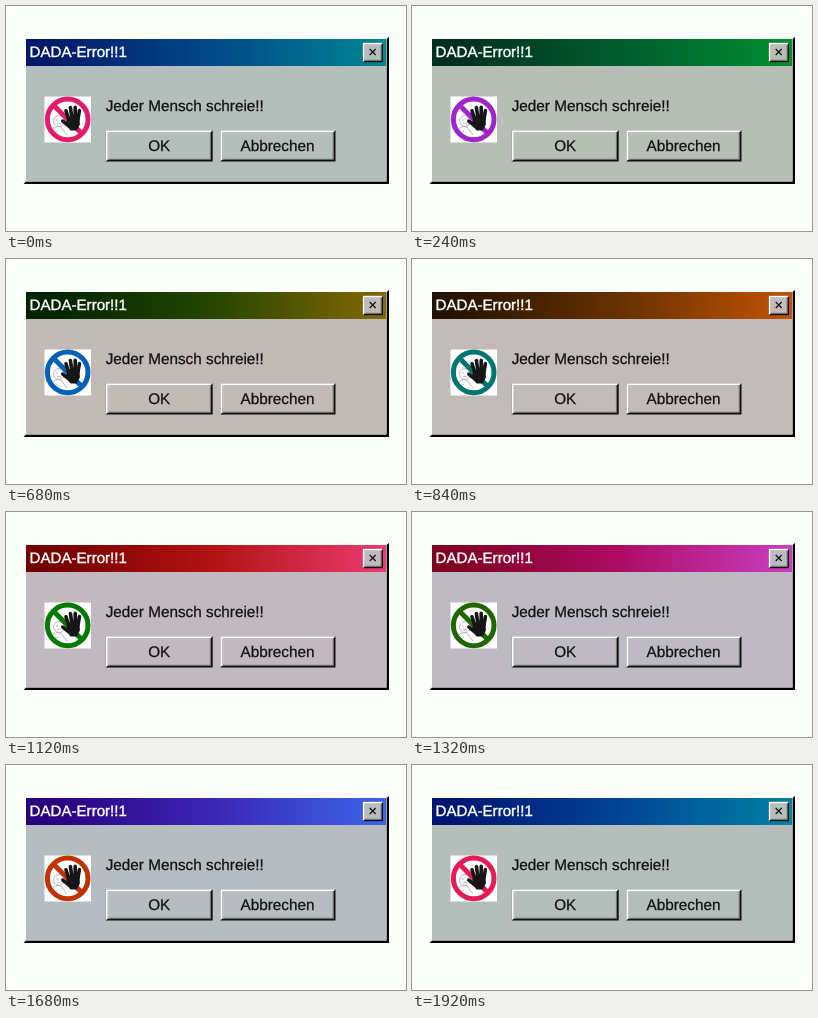
These frames come from a looping animation (400x225 px, 1.96 s). An HTML page:

```html
<!DOCTYPE html>
<html lang="de">
<head>
<meta charset="utf-8">
<style>
  html, body { margin: 0; width: 100%; height: 100%; overflow: hidden; background: #fcfefb; }
  svg { display: block; width: 100vw; height: 100vh; }
  text {
    font: 15.3px "Liberation Sans", Arial, sans-serif; text-rendering: geometricPrecision;
    fill: #111; stroke: #111; stroke-width: .25;
  }
  .title { font-size: 15.1px; fill: #fff; stroke: #fff; stroke-width: .4; }
  .face { fill: var(--panel); }
  .ring { stroke: var(--ring); fill: none; stroke-width: 5; }
  .shade { fill: #000; opacity: .35; }
  .hand { stroke: #161616; stroke-linecap: round; stroke-linejoin: round; fill: none; }
  .sketch { stroke: #aaa; stroke-width: .8; fill: none; }
</style>
</head>
<body>
<svg viewBox="0 0 400 225">
  <defs>
    <linearGradient id="bar">
      <stop offset=".05" stop-color="var(--from)"/>
      <stop offset=".52" stop-color="var(--mid)"/>
      <stop offset="1" stop-color="var(--to)"/>
    </linearGradient>
  </defs>

  <!-- window -->
  <path d="M17.5 178L20 175.5H380.5V33L383 31V178Z"/>
  <path class="face" d="M20 33H380.5V175.5H20Z"/>
  <rect x="20" y="33" width="360" height="27" fill="url(#bar)"/>
  <text class="title" x="23.6" y="51.2">DADA-Error!!1</text>

  <g id="buttons"></g>
  <path d="M363.7 43L369.7 49M369.7 43L363.7 49" stroke="#111" stroke-width="1.2"/>

  <!-- sign -->
  <rect x="38.5" y="90.5" width="46.5" height="46" fill="#fff"/>
  <g class="sketch">
    <circle cx="53" cy="115" r="5.5"/>
    <path d="M50 114h2M55 114h2M51 118q2 -2 4 0M45 125q4 -6 10 -4l6 8M47 128l5 -3"/>
  </g>
  <g class="ring">
    <circle cx="61.7" cy="113.4" r="20.3"/>
    <path d="M47.3 99L76.1 127.8"/>
  </g>
  <g class="hand">
    <path stroke-width="3.6" d="M62.5 113L60 104.8M65.8 111L64.4 101.6M69.2 111L69.2 101.4M72 113L73.4 104.6M63 120L56.8 115.2"/>
    <path fill="#161616" stroke-width="3" d="M62.7 112L72 112L72.4 118L69.8 123L65.3 123L61.5 118Z"/>
  </g>

  <text x="99.7" y="105">Jeder Mensch schreie!!</text>
  <text x="153.2" y="145" text-anchor="middle">OK</text>
  <text x="271.5" y="145" text-anchor="middle">Abbrechen</text>
</svg>
<script>
const STEP = 40, STEPS = 49;
const colors = {
  panel: [180, 190, 186],
  ring: [225, 28, 105],
  // Title bar; values below zero are clipped only after the rotation
  from: [-55, 25, 105],
  mid: [-45, 73, 138],
  to: [-26, 134, 148]
};

// Raised button: black outer edge, white highlight, soft inner shadow
function button(x, y, w, h, e) {
  const r = x + w, b = y + h;
  return `<rect x="${x}" y="${y}" width="${w}" height="${h}" fill="#111"/>
    <path d="M${x} ${b}V${y}H${r}L${r - e} ${y + e}L${x + e} ${b - e}Z" fill="#fff"/>
    <rect class="face" x="${x + e}" y="${y + e}" width="${w - 2 * e}" height="${h - 2 * e}"/>
    <path class="shade" d="M${x + e} ${b - e}l1 -1H${r - e - 1}V${y + e + 1}l1 -1V${b - e}Z"/>`;
}
document.getElementById("buttons").innerHTML =
  button(99.7, 124.3, 107, 31.2, 1.8) + button(214.3, 124.3, 115.2, 31.2, 1.8) + button(356.8, 36.8, 20.2, 19.4, 1.4);

// Hue rotation that preserves luminance
function rotate([r, g, b], angle) {
  const c = Math.cos(angle), s = Math.sin(angle);
  const y = .213 * r + .715 * g + .072 * b;
  const rgb = [
    y + c * (r - y) + s * (-.213 * r - .715 * g + .928 * b),
    y + c * (g - y) + s * (.143 * r + .14 * g - .283 * b),
    y + c * (b - y) + s * (-.787 * r + .715 * g + .072 * b)
  ];
  return `rgb(${rgb.map(v => Math.round(Math.min(255, Math.max(0, v))))})`;
}

const root = document.documentElement.style;
const start = performance.now();
function draw() {
  const n = Math.floor(Math.max(0, performance.now() - start) / STEP) % STEPS;
  const angle = -2 * Math.PI * n / STEPS;
  for (const name in colors) root.setProperty("--" + name, rotate(colors[name], angle));
  requestAnimationFrame(draw);
}
draw();
</script>
</body>
</html>
```
